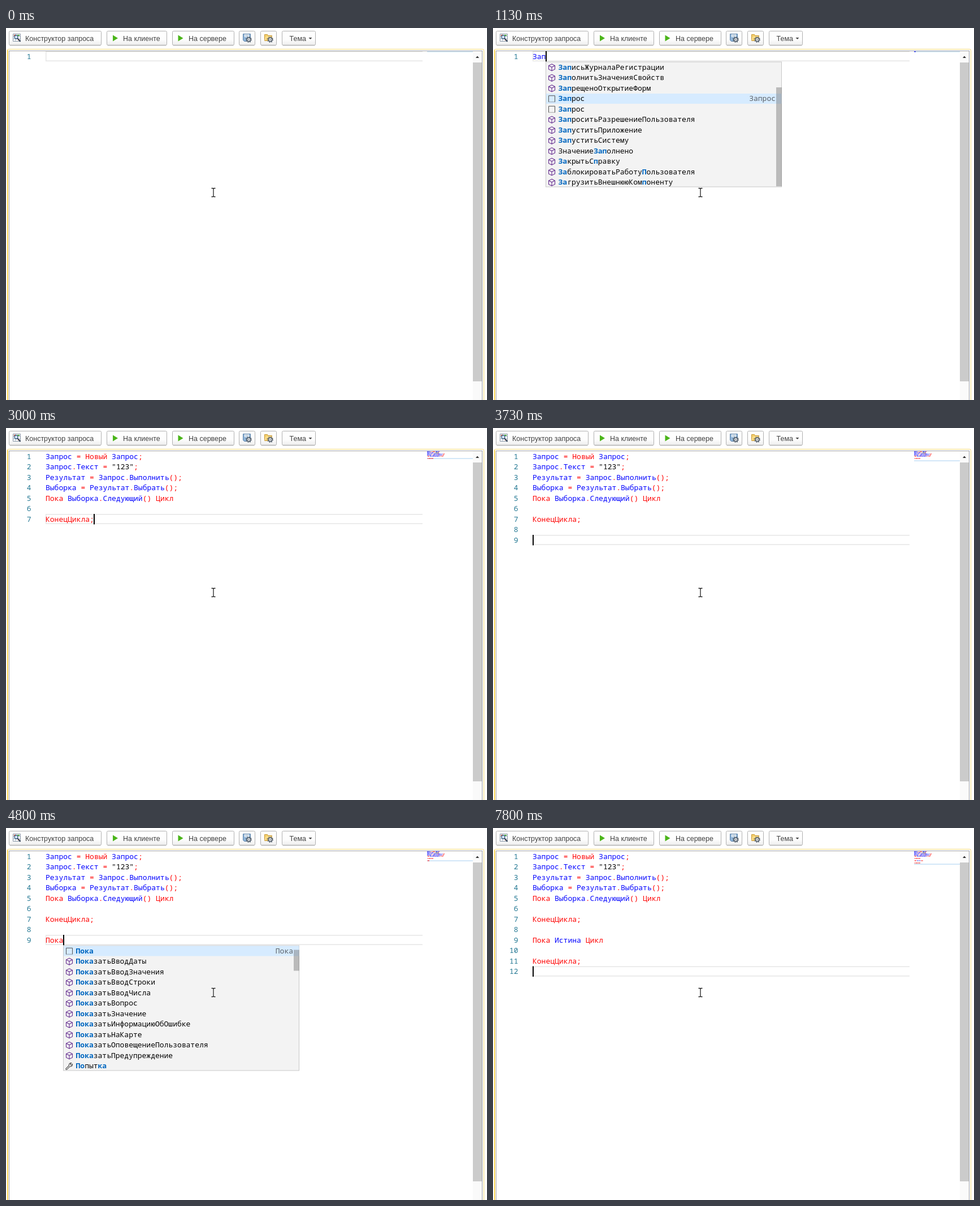
An HTML page that plays this animation: 851 px wide and 658 px high, repeating every 8000 ms.

```html
<!DOCTYPE html>
<html lang="ru">
<head>
<meta charset="utf-8">
<title>Консоль кода</title>
<style>
html, body { margin: 0; width: 100%; height: 100%; overflow: hidden; background: #fff; }
svg { display: block; }
text { white-space: pre; }
.ui { font: 12.5px "Liberation Sans", Arial, sans-serif; fill: #404040; }
.code { font: 13px "Noto Sans Mono", "DejaVu Sans Mono", monospace; }
.num { fill: #237893; text-anchor: end; }
.hit { fill: #0066bf; font-weight: bold; }
</style>
</head>
<body>
<svg width="851" height="658" viewBox="0 0 851 658">
  <defs>
    <linearGradient id="face" x2="0" y2="1">
      <stop offset="0" stop-color="#fff"/><stop offset=".6" stop-color="#fdfdfd"/><stop offset="1" stop-color="#ececec"/>
    </linearGradient>
    <g id="gear">
      <circle r="3.2" fill="#fff" stroke="#55606c" stroke-width="1.6"/>
      <circle r="4.6" fill="none" stroke="#55606c" stroke-width="1.6" stroke-dasharray="1.8 1.81"/>
      <circle r="1.1" fill="#55606c"/>
    </g>
    <path id="method" d="M0-6 5.5-3.2V3.2L0 6-5.5 3.2V-3.2ZM-5.5-3.2 0-.4 5.5-3.2M0-.4V6" fill="none" stroke="#652d90" stroke-width="1.1"/>
    <g id="snippet" fill="none" stroke="#505050">
      <path d="M-5.5 5.5V-5.5H5.5V5.5"/><path d="M-5.5 5.5H6" stroke-dasharray="1 1"/>
    </g>
    <path id="keyword" d="M-5.8 4.2-.6-1C-1.2-3.6.8-6 3.6-5.6L1.6-3.4 3.3-1.7 5.6-3.7C6-.8 3.4 1.2 1 .6L-4.2 5.8Q-5.2 6.4-5.9 5.7T-5.8 4.2Z" fill="none" stroke="#505050" stroke-width="1.1"/>
  </defs>

  <g id="bar"></g>
  <g transform="translate(12 10)">
    <path d="M.5.5H13.5V13.5H.5Z" fill="#fff" stroke="#8794a3"/>
    <path d="M1 4.5H13M1 9H13M5 1V13" stroke="#a9b8c8"/>
    <path d="M2 2H5V4H2ZM9 10H12V12H9Z" fill="#e0583c"/>
    <path d="M8 2H12V4H8Z" fill="#4fae3b"/>
    <circle cx="6" cy="6" r="3" fill="#d9ecfb" stroke="#3d5f83" stroke-width="1.3"/>
    <path d="M8.2 8.2 13.5 14" stroke="#37475a" stroke-width="2"/>
  </g>
  <path d="M189 12.5V23.5L198 18ZM304.500 12.500V23.500L313.500 18Z" fill="#4bb51a"/>
  <g transform="translate(419 10)">
    <path d="M.5.5H13.500V13.500H2.500L.5 11.500Z" fill="#8fb4d8" stroke="#5d83aa"/>
    <path d="M3 1H11V6H3Z" fill="#f3f8fc"/>
    <path d="M4 2.500H10M4 4.500H10" stroke="#9fb6cc"/>
    <use href="#gear" x="10.500" y="10.500"/>
  </g>
  <g transform="translate(457 10)">
    <path d="M.5 12.500V1.500H5.500L7 3.500H13.500V12.500Z" fill="#f4cf6b" stroke="#c6983a"/>
    <path d="M1 12 3 6H14" fill="none" stroke="#fff0bd"/>
    <use href="#gear" x="10.500" y="10.500"/>
  </g>
  <path d="M535.500 17H541.500L538.500 20Z" fill="#404040"/>

  <rect x="2.500" y="37.500" width="843" height="640" rx="2" fill="none" stroke="#f7d774"/>
  <path d="M3 39V658" stroke="#ffc914" stroke-width="1.200"/>
  <rect x="5.500" y="40.500" width="837" height="640" fill="#fff" stroke="#a0a0a0"/>
  <path d="M826 41H842V658H826Z" fill="#fafafa"/>
  <path d="M826 61H842V625H826Z" fill="#cbcbcb"/>
  <path d="M831 53H837L834 49.500Z" fill="#303030"/>

  <g id="editor"></g>
  <g id="popup" class="code"></g>

  <g fill="none">
    <path d="M363.500 283.500H366L367 284.500 368 283.500H370.500M363.500 298.500H366L367 297.500 368 298.500H370.500M367 284V298" stroke="#fff" stroke-width="3"/>
    <path d="M363.500 283.500H366L367 284.500 368 283.500H370.500M363.500 298.500H366L367 297.500 368 298.500H370.500M367 284V298" stroke="#222" stroke-width="1.300"/>
  </g>
</svg>
<script>
const LOOP = 8000, LEFT = 70, TOP = 41, LINE = 18.5, CHAR = 7.8;
const $ = id => document.getElementById(id);
const rect = (x, y, w, h, fill, more = '') =>
  `<rect x="${x}" y="${y}" width="${w}" height="${h}" fill="${fill}" ${more}/>`;
const colX = c => LEFT + c * CHAR;
const rowY = r => TOP + r * LINE;

const buttons = [
  [5, 164, 34, 'Конструктор запроса'], [178, 107, 207, 'На клиенте'], [294, 110, 323, 'На сервере'],
  [412, 29, 0, ''], [450, 29, 0, ''], [488, 60, 501.5, 'Тема']
];
$('bar').innerHTML = buttons.map(([x, w, tx, label]) =>
  rect(x + .5, 5.5, w - 1, 25, 'url(#face)', 'rx="2" stroke="#b0b0b0"') +
  `<path d="M${x + 2} 30.5H${x + w - 2}" stroke="#989898"/>` +
  `<text class="ui" x="${tx}" y="22.5">${label}</text>`).join('');

// Code stages
const query = s => ['Запрос = Новый Запрос;', `Запрос.Текст = "${s}";`, 'Результат = Запрос.Выполнить();',
  'Выборка = Результат.Выбрать();', 'Пока Выборка.Следующий() Цикл', '', 'КонецЦикла;'];
const ready = query('123');
const word = s => [...ready, '', s];
const cycle = s => [...word(`Пока ${s} Цикл`), '', 'КонецЦикла;'];
const off = { off: true };

// time, lines, caret row, caret column, extras
const states = [];
const at = (time, lines, row, col, extra = {}) => states.push({ time, lines, row, col, ...extra });
const typeFirst = (time, s, pop) => at(time, [s], 0, s.length, { pop });
const typeQuery = (time, s) =>
  at(time, query(s), 1, 16 + s.length, { mark: [1, 16, s.length], stop: [5, 2] });
const typeWord = (time, s, pop) => at(time, word(s), 8, s.length, { pop });
const typeCycle = (time, s, extra) =>
  at(time, cycle(s), 8, 5 + s.length, { mark: [8, 5, s.length], stop: [9, 4], ...extra });

at(0, [''], 0, 0, off);
at(130, [''], 0, 0);
at(600, [''], 0, 0, off);
typeFirst(800, 'З');
typeFirst(870, 'З', 'З');
typeFirst(930, 'За', 'За');
typeFirst(1070, 'Зап', 'За');
typeFirst(1130, 'Зап', 'Зап');
typeFirst(1200, 'Запр', 'Запр');
typeFirst(1330, 'Запрос', 'Запрос');
typeQuery(1800, '');
typeQuery(2200, '12');
typeQuery(2330, '123');
at(2870, ready, 1, 19, { off: true, mark: [1, 16, 3], stop: [5, 2] });
at(3000, ready, 6, 11);
at(3470, ready, 6, 11, off);
at(3530, [...ready, ''], 7, 0);
typeWord(3730, '');
at(4200, word(''), 8, 0, off);
typeWord(4470, 'П');
typeWord(4530, 'По', 'П');
typeWord(4600, 'Пок', 'По');
typeWord(4730, 'Пока', 'Пок');
typeWord(4800, 'Пока', 'Пока');
typeCycle(5270, 'Условие', { selected: true });
typeCycle(5800, '');
typeCycle(6000, 'И');
typeCycle(6070, 'Ис');
typeCycle(6130, 'Ист');
typeCycle(6270, 'Исти');
typeCycle(6330, 'Истина');
typeCycle(6870, 'Истина', off);
at(7130, cycle('Истина'), 10, 11);
at(7670, cycle('Истина'), 10, 11, off);
at(7800, [...cycle('Истина'), ''], 11, 0);

const menus = {
  'З': { scroll: [45, 175], names: ['ЗаписьЖурналаРегистрации', 'ЗаполнитьЗначенияСвойств',
    'ЗапрещеноОткрытиеФорм', 'Запрос', 'Запрос', 'ЗапроситьРазрешениеПользователя', 'ЗапуститьПриложение',
    'ЗапуститьСистему', 'ЗначениеЗаполнено', 'ЗакрытьСправку', 'ЗаблокироватьРаботуПользователя',
    'ЗагрузитьВнешнююКомпоненту'] },
  'П': { scroll: [7.5, 37], names: ['Пока', 'ПоказатьВводДаты', 'ПоказатьВводЗначения', 'ПоказатьВводСтроки',
    'ПоказатьВводЧисла', 'ПоказатьВопрос', 'ПоказатьЗначение', 'ПоказатьИнформациюОбОшибке',
    'ПоказатьНаКарте', 'ПоказатьОповещениеПользователя', 'ПоказатьПредупреждение', 'Попытка'] }
};
const kinds = { 'Запрос': 'snippet', 'Пока': 'snippet', 'Попытка': 'keyword' };

function tokens(line) {
  return (line.match(/"[^"]*"|[А-яЁё]+|\s+|[^\s"А-яЁё]/g) || []).map(s => {
    const plain = /^[А-яЁё]/.test(s) && !/^(Новый|Пока|Цикл|КонецЦикла)$/.test(s);
    return [s, s[0] === '"' ? '#000' : plain ? '#00f' : '#f00'];
  });
}

// Indices of matched letters: a solid run first, else a subsequence
function matches(name, typed) {
  const a = name.toLowerCase(), b = typed.toLowerCase(), run = a.indexOf(b);
  if (run >= 0) return [...b].map((_, i) => run + i);
  const hits = [];
  for (const ch of b) {
    const i = a.indexOf(ch, hits.length ? hits[hits.length - 1] + 1 : 0);
    if (i < 0) return null;
    hits.push(i);
  }
  return hits;
}

function minimap(lines) {
  return lines.map((line, r) => {
    let x = 745;
    return tokens(line).map(([s, fill]) => [...s].map(ch => {
      const a = .3 + ch.charCodeAt(0) * 7 % 5 * .09;
      return ch === ' ' ? (x++, '') : rect(x++, TOP + 2 * r, 1, 1.6, fill, `opacity="${a}"`);
    }).join('')).join('');
  }).join('');
}

function drawEditor(s) {
  const y = rowY(s.row);
  let out = rect(745, TOP + 2 * s.row, 81, 2, '#d3e7f8');
  if (!s.selected)
    out += `<path d="M737 ${y + .75}H70.750V${y + 17.25}H737" fill="none" stroke="#e6e6e6" stroke-width="1.5"/>`;
  if (s.mark) {
    const [r, c, n] = s.mark;
    if (s.selected) out += rect(colX(c), rowY(r), n * CHAR, LINE, '#add6ff');
    out += rect(colX(c), rowY(r), n * CHAR, LINE, '#0a3264', 'opacity=".2"');
  }
  if (s.stop) out += rect(Math.floor(colX(s.stop[1])) - .5, rowY(s.stop[0]), 1.8, LINE, '#8498b1');
  s.lines.forEach((line, r) => {
    const base = rowY(r) + 13.5;
    const spans = tokens(line).map(([t, fill]) => `<tspan fill="${fill}">${t}</tspan>`).join('');
    out += `<text class="code num" x="44.600" y="${base}">${r + 1}</text>` +
      `<text class="code" x="${LEFT}" y="${base}">${spans}</text>`;
  });
  out += minimap(s.lines);
  if (!s.off) out += rect(Math.floor(colX(s.col)), y, 2, LINE, '#000');
  $('editor').innerHTML = out;
}

function drawPopup(s) {
  if (!s.pop) return void ($('popup').innerHTML = '');
  const { names, scroll } = menus[s.pop[0]];
  const items = names.filter(n => matches(n, s.pop));
  const pick = items.findIndex(n => kinds[n] === 'snippet');
  const x = Math.floor(colX(s.pop.length)), y = rowY(s.row + 1) + .5, h = items.length * LINE;
  let out = rect(x + .5, y, 417, h - 1, '#f3f3f3', 'stroke="#c8c8c8"');
  items.forEach((name, i) => {
    const mid = y + (i + .5) * LINE, hits = matches(name, s.pop);
    if (i === pick)
      out += rect(x + 1, mid - LINE / 2 + .5, 416.5, LINE - .5, '#d6ebff') +
        `<text x="${x + 407}" y="${mid + 4.5}" text-anchor="end" fill="#5a6066">${name}</text>`;
    const label = [...name].map((ch, k) => hits.includes(k) ? `<tspan class="hit">${ch}</tspan>` : ch).join('');
    out += `<use href="#${kinds[name] || 'method'}" x="${x + 11}" y="${mid + .5}"/>` +
      `<text x="${x + 22.5}" y="${mid + 4.5}">${label}</text>`;
  });
  if (items.length > 11) out += rect(x + 408, y + scroll[0], 10, scroll[1], '#646464', 'opacity=".4"');
  $('popup').innerHTML = out;
}

const start = performance.now();
let shown;
function frame() {
  const t = (performance.now() - start) % LOOP;
  const state = states.filter(s => s.time <= t).pop();
  if (state !== shown) {
    shown = state;
    drawEditor(state);
    drawPopup(state);
  }
  requestAnimationFrame(frame);
}
frame();
</script>
</body>
</html>
```
